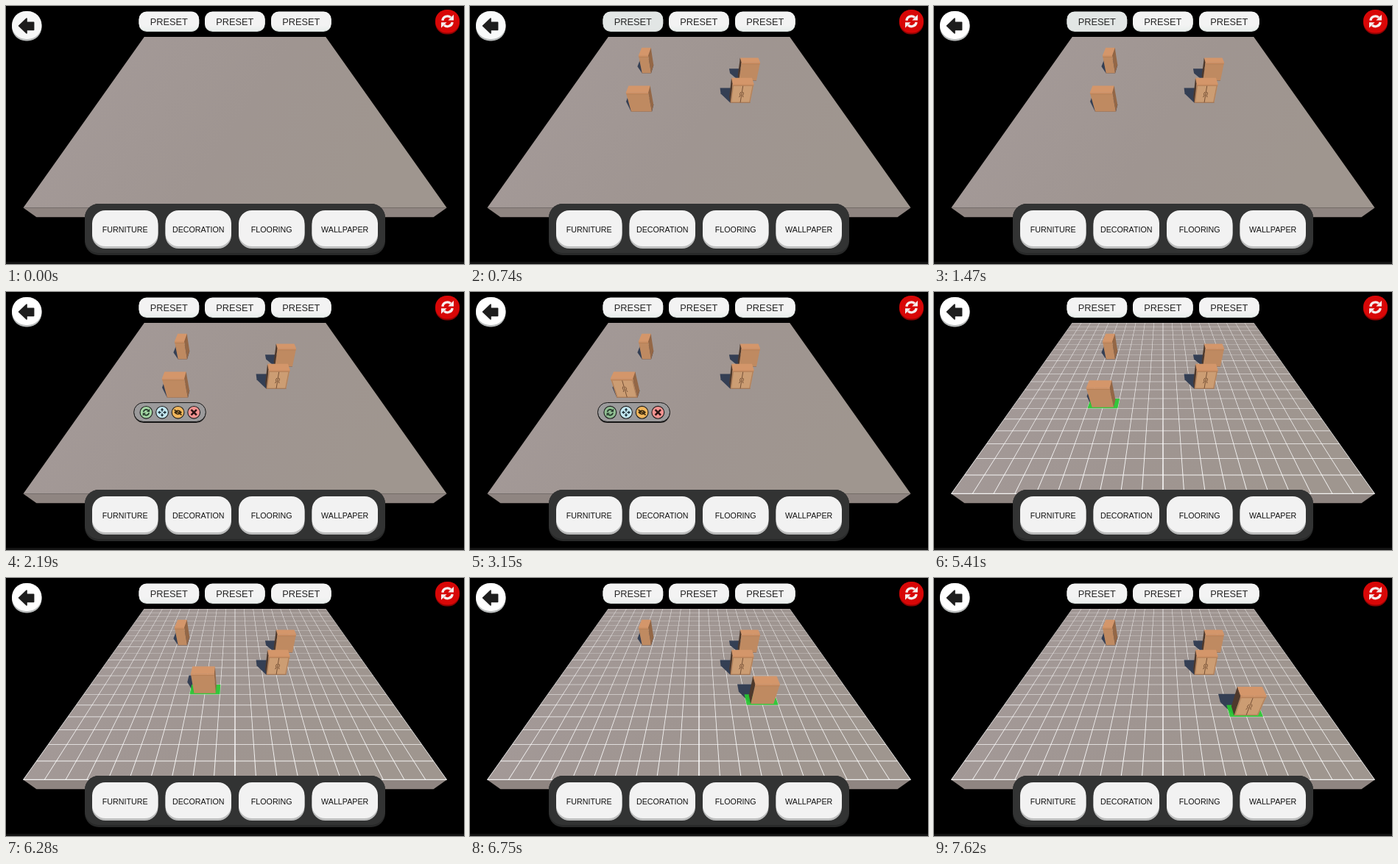
Write an HTML page with a canvas that moves like this. It is 622 px wide and 351 px high and loops after 8 s.

```html
<!DOCTYPE html>
<html lang="en">
<head>
<meta charset="utf-8">
<title>Room planner</title>
<style>
  html, body { margin: 0; width: 100%; height: 100%; overflow: hidden; background: #000; }
  canvas, svg { position: absolute; left: 0; top: 0; width: 622px; height: 351px; }
  text { font-family: "Liberation Sans", Arial, sans-serif; text-anchor: middle; fill: #262626; }
  .preset { font-size: 12.8px; }
  .menu { font-size: 10.7px; fill: #111; }
</style>
</head>
<body>
<canvas id="room"></canvas>
<svg viewBox="0 0 622 351">
  <defs>
    <g id="spin">
      <g id="half">
        <path d="M-6-1A6 6 0 0 1 4-4.6" fill="none" stroke="currentColor" stroke-width="2.9"/>
        <path d="M7.6-8V-1.2H.8Z" fill="currentColor"/>
      </g>
      <use href="#half" transform="rotate(180)"/>
    </g>
    <linearGradient id="key" x2="0" y2="1">
      <stop offset=".7" stop-color="#f3f3f3"/><stop offset="1" stop-color="#e9eeec"/>
    </linearGradient>
  </defs>

  <rect y="348" width="622" height="3" fill="#131313"/>

  <rect x="8" y="9" width="40.5" height="38.5" rx="19" fill="#b9bcbc"/>
  <rect id="back" x="8" y="7" width="40.5" height="38" rx="19"/>
  <path d="M17.5 27 28 17V22.2H37.6V32.4H28V37Z" fill="#1d1d1d" stroke="#1d1d1d" stroke-width="1.6" stroke-linejoin="round"/>

  <rect x="583" y="6.5" width="33" height="32" rx="15.5" fill="#8f0303"/>
  <rect x="583" y="5" width="33" height="31.5" rx="15.5" fill="#d80707"/>
  <use href="#spin" transform="translate(599.5 20.8) scale(1.12)" color="#f6eeee"/>

  <g id="presets"></g>

  <rect x="107" y="269" width="408" height="70" rx="19" fill="#282929"/>
  <rect x="107" y="269" width="408" height="67" rx="19" fill="#323333"/>
  <g id="menu"></g>

  <g id="popup">
    <rect x="173.5" y="151.5" width="98" height="26.5" rx="13.2" fill="#151515"/>
    <rect x="173.5" y="150.5" width="98" height="26" rx="13" fill="#9b9a9b" stroke="#161616"/>
    <g stroke="#1b1b1b" stroke-width="1.1">
      <circle id="turn" cx="190.3" cy="163.8" r="8.4"/>
      <circle id="move" cx="212" cy="163.8" r="8.4"/>
      <circle cx="233.6" cy="163.8" r="8.4" fill="#f1b65c"/>
      <circle cx="255.3" cy="163.8" r="8.4" fill="#f39391"/>
    </g>
    <use href="#spin" transform="translate(190.3 163.8) scale(.62)" color="#24372a"/>
    <g transform="translate(212 163.8)" fill="#1f3038">
      <path id="tip" d="M0-6 2.3-3H.7V-1.4H-.7V-3H-2.3Z"/>
      <use href="#tip" transform="rotate(90)"/>
      <use href="#tip" transform="rotate(180)"/>
      <use href="#tip" transform="rotate(270)"/>
    </g>
    <g transform="translate(233.6 163.8)">
      <path d="M-5.4 0Q0-6.5 5.4 0 0 6.5-5.4 0Z" fill="#3a2a10"/>
      <circle r="1.7" fill="#f1b65c"/>
      <path d="M-5-3.6 5 3.6" stroke="#3a2a10" stroke-width="1.6"/>
    </g>
    <path d="M251.6 160.1 259 167.5M259 160.1 251.6 167.5" stroke="#2b1515" stroke-width="2.5"/>
  </g>
</svg>
<script>
const LOOP = 8000, W = 622, H = 351;
const $ = id => document.getElementById(id);
const clamp = v => Math.max(0, Math.min(1, v));
const mix = (a, b, k) => 'rgb(' + a.map((v, i) => Math.round(v + (b[i] - v) * k)) + ')';

// ---- buttons ----
$('presets').innerHTML = [180.5, 270, 360].map((x, i) => `
  <rect x="${x}" y="8" width="81.7" height="27" rx="10.5" fill="#cfd6d3"/>
  <rect id="p${i}" x="${x}" y="7.5" width="81.7" height="26.5" rx="10.5" fill="url(#key)"/>
  <text class="preset" x="${x + 40.8}" y="26">PRESET</text>`).join('');
$('menu').innerHTML = ['FURNITURE', 'DECORATION', 'FLOORING', 'WALLPAPER'].map((name, i) => {
  const x = 117 + i * 99.5;
  return `
  <rect x="${x}" y="281" width="89.5" height="49" rx="18" fill="#bcbdbd"/>
  <rect x="${x}" y="278" width="89.5" height="49" rx="18" fill="#f2f2f2"/>
  <text class="menu" x="${x + 44.7}" y="308">${name}</text>`;
}).join('');

// ---- scene ----
const canvas = $('room'), ctx = canvas.getContext('2d');
const dpr = window.devicePixelRatio || 1;
canvas.width = W * dpr;
canvas.height = H * dpr;

// Camera 10 units up, pitched down 45 degrees; d is the distance ahead.
const project = (x, y, d) => {
  const z = d + 10 - y;
  return [311 + 305 * x / (z * Math.SQRT1_2), 172.8 + 305 * (10 - y - d) / z];
};

function trace(points) {
  ctx.beginPath();
  points.forEach(p => ctx.lineTo(...project(...p)));
}
function fill(color, ...points) {
  trace(points);
  ctx.closePath();
  ctx.fillStyle = color;
  ctx.fill();
}
function line(color, width, ...points) {
  trace(points);
  ctx.strokeStyle = color;
  ctx.lineWidth = width;
  ctx.stroke();
}
const patch = (color, x0, x1, d0, d1) =>
  fill(color, [x0, 0, d0], [x1, 0, d0], [x1, 0, d1], [x0, 0, d1]);

const floorTint = ctx.createLinearGradient(150, 60, 470, 275);
floorTint.addColorStop(0, '#a39997');
floorTint.addColorStop(.5, '#9f9591');
floorTint.addColorStop(1, '#9f968f');

function drawFloor(grid) {
  fill('#8f8581', [-10, 0, 5], [10, 0, 5], [10, -1, 5], [-10, -1, 5]);
  patch(floorTint, -10, 10, 5, 25);
  if (!grid) return;
  ctx.globalAlpha = grid * .9;
  for (let i = 0; i <= 20; i++) {
    const x = i - 10, d = i + 5, r = x ? .018 : .03;
    patch('#fff', x - r, x + r, 5, 25);
    patch('#fff', -10, 10, d - .022, d + .022);
  }
  ctx.globalAlpha = 1;
}

// Floor cells covered by a cabinet turned about its pivot cell: [x, d, width, depth].
const cells = {
  back: (x, d) => [x, d, 2, 1],
  front: (x, d) => [x - 1, d, 2, 1],
  left: (x, d) => [x, d, 1, 2],
  right: (x, d) => [x, d - 1, 1, 2]
};
const TALL = 1.6, LID = 1.48;

function cabinet(x, d, pose) {
  const [cx, cd, w, n] = cells[pose](x, d);
  const inset = size => size > 1 ? .28 : .11;
  const ix = inset(w), id = inset(n);
  return { pose, cx, cd, w, n, x0: cx + ix, x1: cx + w - ix, d0: cd + id, d1: cd + n - id };
}

function drawShadow({ x0, x1, d0, d1 }) {
  const dx = -.62, dd = 1.15;
  fill('#343f54', [x0, 0, d0], [x1, 0, d0], [x1, 0, d1], [x1 + dx, 0, d1 + dd],
    [x0 + dx, 0, d1 + dd], [x0 + dx, 0, d0 + dd]);
}

function drawDoors(at, paint) {
  const ink = '#6b482f';
  fill(paint, at(.04, .05), at(.96, .05), at(.96, LID - .05), at(.04, LID - .05));
  line('#9a6e4a', .5, at(.04, LID - .05), at(.04, .05), at(.96, .05), at(.96, LID - .05));
  line(ink, .9, at(.5, .04), at(.5, LID - .04));
  for (const s of [-1, 1])
    line(ink, .9, at(.5 + s * .1, .5), at(.5 + s * .06, .66), at(.5 + s * .09, .8), at(.5 + s * .05, .95));
}

function drawCabinet(c) {
  const { x0, x1, d0, d1, pose } = c;
  const faces = [];
  if (x0 > 0) faces.push(['left', (u, y) => [x0, y, d1 + (d0 - d1) * u], '#4e392c', '#5d4331', '#664934']);
  if (x1 < 0) faces.push(['right', (u, y) => [x1, y, d0 + (d1 - d0) * u], '#946746', '#a2714d', '#a57a55']);
  faces.push(['front', (u, y) => [x0 + (x1 - x0) * u, y, d0], '#bf8a61', '#cf9165', '#cc9d73']);
  for (const [side, at, body, rim, doors] of faces) {
    fill(body, at(0, 0), at(1, 0), at(1, TALL), at(0, TALL));
    if (side === pose) drawDoors(at, doors);
    fill(rim, at(0, LID), at(1, LID), at(1, TALL), at(0, TALL));
    line('rgba(90,55,30,.3)', .5, at(0, LID), at(1, LID));
  }
  fill('#d4966a', [x0, TALL, d0], [x1, TALL, d0], [x1, TALL, d1], [x0, TALL, d1]);
}

// ---- timeline ----
const fixed = [cabinet(-5, 17, 'left'), cabinet(3, 16, 'back'), cabinet(3, 13, 'front')];
const steps = [
  [740, -5, 12, 'back'], [2810, -5, 12, 'right'], [3150, -5, 12, 'front'],
  [3560, -5, 12, 'left'], [3770, -5, 12, 'back'], [4110, -5, 12, 'right'],
  [4450, -5, 12, 'front'], [5410, -5, 11, 'back'], [6280, -3, 11, 'back'],
  [6350, -2, 11, 'back'], [6420, -1, 11, 'back'], [6480, 0, 11, 'back'],
  [6550, 1, 11, 'back'], [6620, 2, 10, 'back'], [6750, 3, 10, 'back'],
  [6820, 4, 10, 'back'], [6960, 5, 9, 'back'], [7420, 5, 9, 'left'], [7620, 5, 9, 'front']
];
const presses = [2400, 2810, 3150, 3560, 3770, 4110, 4450];
const MOVE = 5340, PLACE = 5410;

function drawScene(t) {
  ctx.setTransform(dpr, 0, 0, dpr, 0, 0);
  ctx.fillStyle = '#000';
  ctx.fillRect(0, 0, W, H);
  drawFloor(t < MOVE ? 0 : clamp((t - MOVE + 70) / 140));

  const step = steps.filter(s => s[0] <= t).pop();
  if (!step) return;
  const active = cabinet(...step.slice(1));
  const all = [...fixed, active].sort((a, b) => b.d0 - a.d0);
  all.forEach(drawShadow);
  if (t >= PLACE) {
    const { cx, cd, w, n } = active;
    patch('rgba(38,205,48,.88)', cx, cx + w, cd, cd + n);
  }
  all.forEach(drawCabinet);
}

function drawButtons(t) {
  $('back').setAttribute('fill', mix([246, 247, 247], [255, 255, 255], clamp((t - 670) / 200)));
  const hover = t < 1540 ? clamp((t - 600) / 140) : 1 - clamp((t - 1540) / 140);
  $('p0').setAttribute('fill', hover > 0 ? mix([242, 243, 243], [226, 230, 229], hover) : 'url(#key)');

  const grow = clamp((t - 2050) / 150);
  const popup = $('popup');
  popup.style.display = grow > 0 && t < MOVE ? '' : 'none';
  const size = 1 - (1 - grow) ** 2;
  popup.setAttribute('transform', `translate(222.5 164) scale(${size}) translate(-222.5 -164)`);

  const down = presses.some(p => t >= p && t < p + 70);
  $('turn').setAttribute('fill', down ? '#8fbd92' : '#a3d5a3');
  const held = t >= 5000 && t < 5130;
  $('move').setAttribute('fill', held ? '#9fc3cd' : t >= 4860 ? '#b5dbe6' : '#c3e8f1');
}

const start = performance.now();
function tick(now) {
  const t = Math.max(0, now - start) % LOOP;
  drawScene(t);
  drawButtons(t);
  requestAnimationFrame(tick);
}
tick(start);
</script>
</body>
</html>
```
